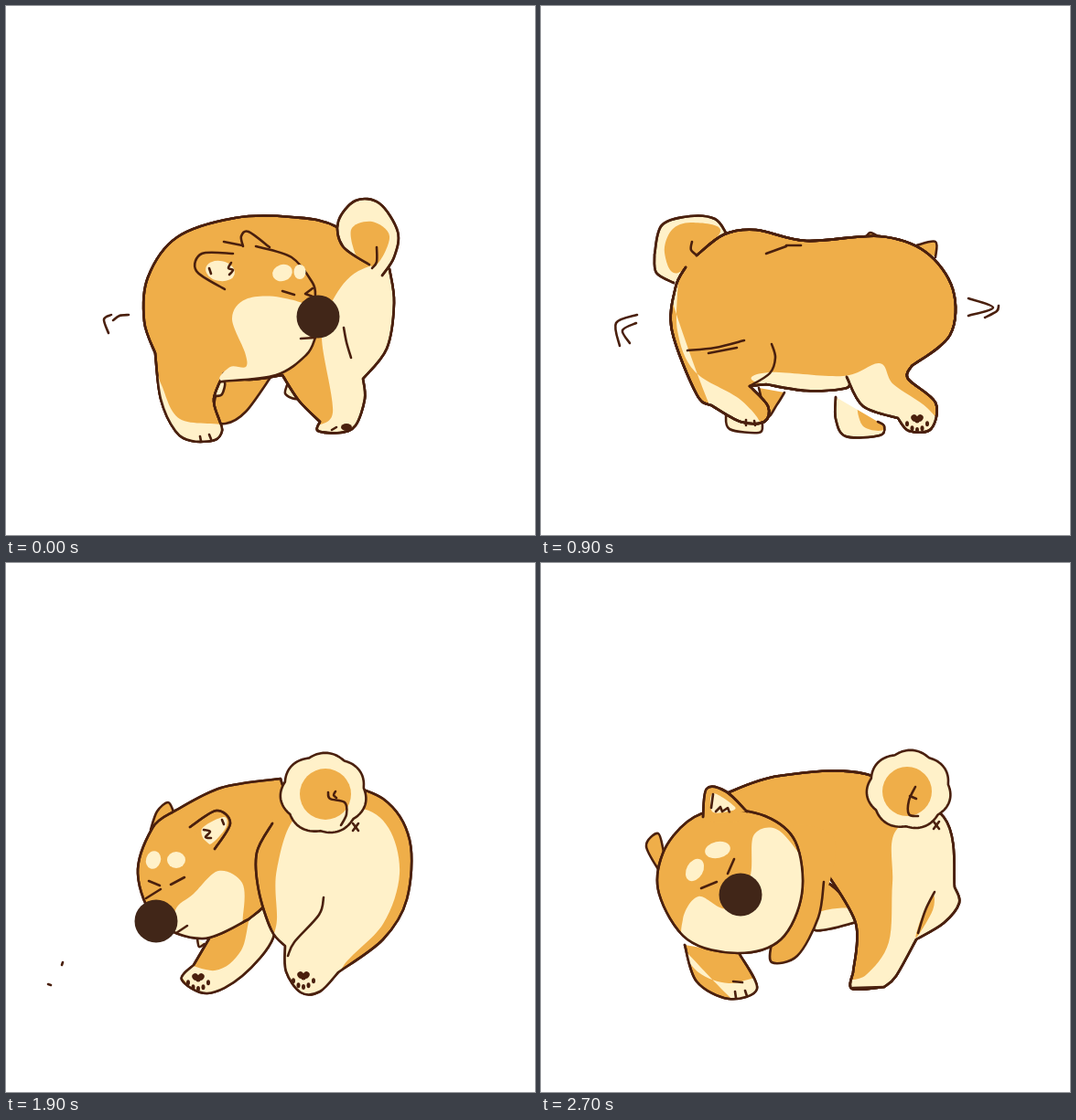
Write an HTML page with a canvas that moves like this. It is 578x579 px and loops after 2800 ms.

```html
<!DOCTYPE html>
<html lang="en">
<head>
<meta charset="utf-8">
<title>Spinning dog</title>
<style>
  html, body { margin: 0; width: 100%; height: 100%; overflow: hidden; background: #fff; }
  canvas { display: block; }
</style>
</head>
<body>
<canvas id="stage" width="578" height="579"></canvas>
<script>
const ctx = document.getElementById('stage').getContext('2d');
const ORANGE = '#efae49', CREAM = '#fff1c9', INK = '#4a200e', NOSE = '#412618';
const STEP = 100;
let base;

// Smooth curve through "x,y" points; "!" marks a corner.
function curve(text, closed) {
  const points = text.split(' ').flatMap(word => {
    const point = word.split(',').map(parseFloat);
    return word.endsWith('!') ? [point, point] : [point];
  });
  if (closed) points.push(points[0]);
  const path = new Path2D();
  path.moveTo(...points[0]);
  for (let i = 1; i < points.length; i++) {
    const b = points[i - 1], c = points[i];
    if (b === c) continue;
    const a = points[i - 2] || (closed ? points.at(-2) : b);
    const d = points[i + 1] || (closed ? points[1] : c);
    path.bezierCurveTo(
      b[0] + (c[0] - a[0]) / 6, b[1] + (c[1] - a[1]) / 6,
      c[0] - (d[0] - b[0]) / 6, c[1] - (d[1] - b[1]) / 6, ...c);
  }
  return path;
}

function fill(color, path) {
  ctx.fillStyle = color;
  ctx.fill(path);
}

function outlined(color, path) {
  base = path;
  fill(color, path);
  ctx.stroke(path);
}

// Colours part of the last outlined shape.
function patch(color, text) {
  ctx.save();
  ctx.clip(base);
  fill(color, curve(text, true));
  ctx.restore();
  ctx.stroke(base);
}

function oval(color, x, y, rx, ry = rx, turn = 0) {
  const path = new Path2D();
  path.ellipse(x, y, rx, ry, turn, 0, 2 * Math.PI);
  fill(color, path);
}

const orange = (text, closed) => outlined(ORANGE, curve(text, closed));
const cream = (text, closed) => outlined(CREAM, curve(text, closed));
const line = text => ctx.stroke(curve(text));
const nose = (x, y) => oval(NOSE, x, y, 23.5);

function pads(x, y) {
  oval(INK, x - 3, y - 1, 3.5, 4, -0.6);
  oval(INK, x + 3, y - 1, 3.5, 4, 0.6);
  oval(INK, x, y + 2, 2.5);
  for (let i = -2; i <= 2; i++) oval(INK, x + i * 5.5, y + 12 - i * i * 1.7, 2, 3);
}

function cross(x, y) {
  line(`${x - 3},${y - 4} ${x + 3},${y + 4}`);
  line(`${x + 3},${y - 4} ${x - 3},${y + 4}`);
}

// Fluffy tail with scalloped rim.
function tail(x, y, rx, ry) {
  const rim = new Path2D();
  for (let a = 0; a < 6.3; a += 0.05) {
    const r = 0.96 + 0.07 * Math.abs(Math.sin(3.5 * a + 0.5));
    rim.lineTo(x + rx * r * Math.cos(a), y + ry * r * Math.sin(a));
  }
  rim.closePath();
  outlined(CREAM, rim);
}

function rump() {
  orange('291,285 274,317 276,358 290,402 305,419! 306,447 322,470 343,469 363,448! 412,412 438,368 441,303 412,258 350,236');
  patch(CREAM, '320,275 296,335 296,390 292,420 305,480 365,475 368,442 412,395 430,340 418,290 385,268');
  line('308,430 315,415 342,385 347,366');
  pads(325, 452);
  cross(382, 289);
  tail(347, 252, 46, 43);
  oval(ORANGE, 349, 253, 28);
  line('366,287 372,275 370,262 354,258 352,251');
  line('360,250 358,254 361,257');
}

function shifted(dx, draw) {
  ctx.save();
  ctx.translate(dx, 0);
  draw();
  ctx.restore();
}

function curledRight() {
  cream('307,415 305,424 312,429 323,431');
  orange('290,405 262,444 240,457 226,450 232,412');
  cream('230,412 239,412 236,425 229,427');
  orange('302,404 320,432 343,455! 341,465 365,467 382,459 392,430 390,408! 416,375 424,325 419,288! 362,242 312,231 250,232 187,253 155,297 151,345 163,380! 169,430 185,465 203,476 228,475 236,465 233,453! 227,430 238,402! 265,409 302,404');
  patch(CREAM, '357,322 385,290 430,285 430,350 395,410 395,455 365,480 335,462 357,445 345,362');
  patch(CREAM, '158,380 170,415 190,452 240,460 240,485 185,482');
  fill(CREAM, curve('247,342 262,321 300,319 338,335 333,376 295,403 236,410 245,395 262,395 261,379', true));
  line('338,363 328,382 295,404 236,411');
  line('259,263 257,252 265,247 288,264');
  line('273,263 312,275 335,303 338,318');
  line('238,258 258,262');
  line('239,310 208,290 214,271 248,271');
  oval(CREAM, 234, 290, 16, 11, 0.2);
  line('246,281 243,287 248,289 244,294');
  line('222,287 224,293');
  oval(CREAM, 302, 292, 11, 9, -0.3);
  oval(CREAM, 321, 291, 6.5, 8);
  line('302,312 315,316');
  line('335,309 327,315! 335,318');
  line('322,364 338,363');
  line('369,352 372,368 377,385');
  line('213,476 212,471');
  line('224,474 222,469');
  line('356,464 361,461');
  oval(INK, 372, 461, 6, 4);
  cream('397,283 368,263 363,236 382,213 408,216 428,247 424,275 411,295');
  patch(ORANGE, '377,245 400,236 419,252 405,283 386,280');
  line('405,264 405,280 400,287');
  line('112,358 107,343 115,338');
  line('117,344 124,339 134,338');
  nose(341, 340);
}

function facingRight() {
  tail(237, 240, 29, 27);
  oval(ORANGE, 238, 243, 18);
  orange('235,405 243,455 270,460 290,408');
  orange('360,395 388,452 410,455 392,405');
  orange('165,300 215,247 310,236 395,265 415,310 375,398! 360,455 350,481 322,481 308,410! 275,418 235,412! 236,462 200,476 174,430 164,385! 153,345 165,300');
  patch(CREAM, '148,310 168,390 198,455 240,460 235,485 145,400');
  patch(CREAM, '238,403 312,400 328,455 370,466 310,490 300,420');
  line('322,478 321,472');
  line('336,480 335,473');
  orange('325,285 331,250 360,275');
  orange('395,270 404,256 415,284');
  orange('335,300 378,268 428,291 438,358 390,399 337,374', true);
  patch(CREAM, '378,365 408,333 450,335 445,400 365,402');
  oval(CREAM, 404, 304, 8, 9);
  oval(CREAM, 427, 305, 5, 8);
  line('396,326 410,329');
  line('424,326 432,321');
  nose(428, 347);
  line('112,340 101,348 99,361 106,369');
}

function fromBehindRight() {
  cream('145,303 126,292 124,272! 132,240 163,230 190,233 202,248');
  patch(ORANGE, '135,270 143,245 165,237 196,247 150,292');
  line('165,258 164,267 172,274');
  orange('410,262 431,258 431,275');
  orange('355,253 360,248 370,253');
  cream('202,447 206,463 238,467 242,458');
  orange('266,423 258,436 247,449 238,418');
  cream('322,428 322,452 333,471 370,470 375,460 368,455');
  patch(ORANGE, '347,432 352,460 378,462 372,430');
  orange('170,273 200,250 235,245 290,257 370,252 420,269 450,310 447,360 405,394! 401,408 431,434 426,463 402,465 390,451! 352,438 334,406! 334,418 290,421 246,414! 228,416! 248,438 244,455 218,455 186,437! 170,425 143,355 147,308 158,286');
  patch(CREAM, '136,300 149,297 149,355 168,400 218,431 240,462 200,470');
  patch(CREAM, '236,412 249,401 330,405 370,391 385,414 422,440 435,465 375,470 335,430');
  patch(CREAM, '402,398 426,380 430,392');
  line('252,370 256,385 250,402 228,416');
  line('160,377 190,374 222,366');
  line('183,380 214,374');
  line('246,271 268,263');
  line('268,262 284,262');
  line('224,459 224,453');
  line('234,459 233,454');
  pads(411, 452);
  line('105,338 82,347 86,372');
  line('104,347 89,355 97,369');
  line('467,320 494,330 467,339');
  line('500,328 498,334 485,341');
}

function behindTurning() {
  orange('345,250 355,239 365,252');
  orange('352,400 352,450 380,468 402,440 410,395');
  patch(CREAM, '358,390 380,440 415,420 410,480 345,475 340,400');
  orange('215,247 310,241 402,262 443,330 408,391 300,414 255,410');
  patch(CREAM, '250,402 330,396 410,382 400,425 250,430');
  pads(378, 450);
  line('470,368 490,354 497,340');
  line('468,357 484,344');
  shifted(-115, rump);
}

function behindLeft() {
  orange('173,290 182,261 196,272');
  cream('220,385 202,440 207,461 246,456 260,380');
  patch(ORANGE, '215,380 232,440 262,425');
  orange('235,395 168,365 164,298 225,249 330,240 412,283 417,356 350,405');
  patch(CREAM, '155,350 205,370 230,400 160,400');
  pads(220, 451);
  line('449,372 457,360 461,348');
  shifted(-55, rump);
}

function headLeft() {
  orange('158,292 165,272 177,262 183,272');
  orange('286,372 292,410 258,452 220,471 192,456 205,440! 222,411');
  patch(CREAM, '180,435 228,446 257,424 270,380 300,370 295,425 230,480');
  cream('209,411 211,420 217,417');
  pads(210, 454);
  orange('183,272 235,246 300,236! 315,300 290,365 265,390! 215,411 165,392 144,340 160,290 183,272');
  patch(CREAM, '185,380 205,362 232,337 258,350 259,385 250,415 188,412');
  orange('201,289 230,271 245,285 228,313');
  patch(CREAM, '214,291 238,278 240,290 222,308');
  line('216,292 223,294 218,300 224,301');
  line('236,281 238,286');
  oval(CREAM, 161, 325, 8, 10, 0.3);
  oval(CREAM, 186, 325, 10, 9);
  line('156,348 168,353');
  line('180,352 195,344');
  line('153,367 169,357');
  line('186,405 198,397');
  nose(164, 392);
  line('62,437 61,440');
  line('46,461 49,462');
  rump();
}

function headFront() {
  orange('345,393 300,402 290,380 310,350 335,370');
  patch(CREAM, '295,386 338,378 355,400 300,412');
  orange('200,253 260,233 355,231 440,278 452,355! 457,372 440,394 410,412! 388,452 375,464! 340,466 341,448! 344,395 312,339');
  patch(CREAM, '390,290 384,350 380,415 355,451 330,460 380,480 465,390 460,270');
  patch(ORANGE, '428,363 428,380 410,410 415,390');
  line('430,360 420,380 412,405');
  line('341,465 375,464');
  fill(ORANGE, curve('250,300 320,300 300,390 260,420', true));
  orange('309,349 303,388 280,430 252,437 252,415');
  orange('157,418 170,458 205,477 236,466 217,428');
  patch(CREAM, '148,415 172,448 205,460 240,455 225,490');
  line('213,476 212,469');
  line('225,474 223,468');
  line('210,458 220,459');
  orange('131,340 115,310 128,296 134,316');
  orange('133,318 160,283 195,270 245,277 278,305 285,362 262,412 215,427 160,412 129,362', true);
  patch(CREAM, '228,345 233,297 264,296 295,360 240,440 163,420 155,390 172,365 203,378');
  orange('177,278 181,247 202,250 225,272');
  patch(CREAM, '188,252 212,267 204,272 187,272');
  line('188,253 186,268');
  line('191,272 196,267! 198,272! 204,268! 206,273');
  fill(ORANGE, curve('183,277 220,273 218,282 190,284', true));
  oval(CREAM, 193, 314, 14, 9, -0.2);
  oval(CREAM, 168, 336, 9, 13, 0.5);
  line('175,356 192,349');
  line('204,340 211,324');
  nose(218, 363);
  tail(402, 248, 45, 42);
  oval(ORANGE, 400, 250, 27);
  line('409,245 402,260 402,275 412,277');
  line('403,255 410,258');
  cross(432, 287);
}

const poses = [curledRight, facingRight, fromBehindRight, behindTurning, behindLeft, headLeft, headFront];

ctx.strokeStyle = INK;
ctx.lineWidth = 2.6;
ctx.lineCap = ctx.lineJoin = 'round';

function tick() {
  ctx.clearRect(0, 0, 578, 579);
  poses[Math.floor(performance.now() / STEP) % poses.length]();
  requestAnimationFrame(tick);
}
tick();
</script>
</body>
</html>
```
